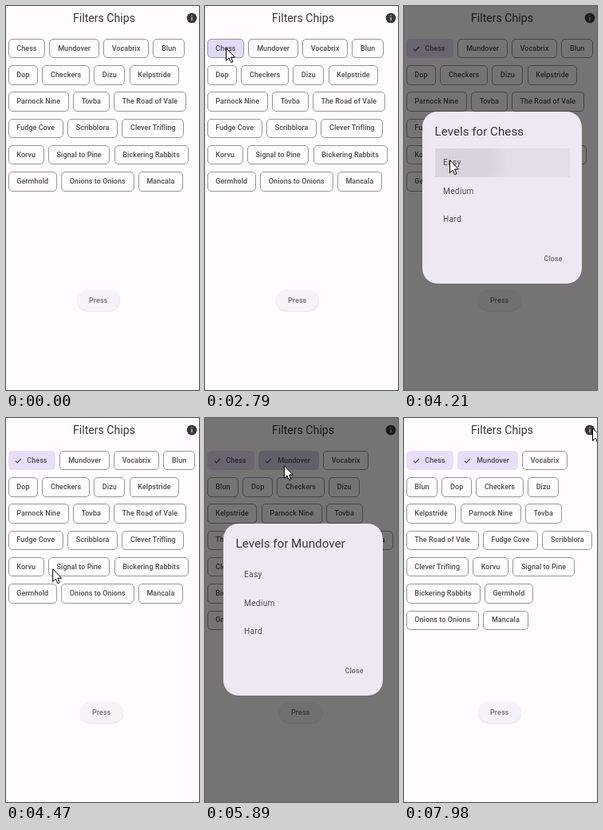
Write an HTML page that moves like this. It is 242 by 480 pixels and loops after 8 s.

```html
<!DOCTYPE html>
<html lang="en">
<head>
<meta charset="utf-8">
<title>Filters Chips</title>
<style>
* { box-sizing: border-box; }
html, body { margin: 0; width: 100%; height: 100%; overflow: hidden; }
body { background: #fffbfe; font: 500 9px/1 Roboto, sans-serif; letter-spacing: .06px; color: #4e4a51; }
#stage { position: relative; width: 242px; height: 480px; overflow: hidden; background: #fffbfe; }
#stage > * { position: absolute; }
h1, h2 { margin: 0; font-weight: 400; letter-spacing: 0; color: #39363c; white-space: nowrap; }
h1 { left: 23px; top: 4.5px; width: 200px; font-size: 14.1px; line-height: 20px; text-align: center; }
#info { left: 226px; top: 8px; }
#chips { left: 2.6px; top: 40.8px; width: 237px; display: flex; flex-wrap: wrap; gap: 8.8px 5.2px; }
.chip { position: relative; height: 24.5px; padding: 0 9.7px; display: flex; align-items: center;
  border: 1px solid #99949c; border-radius: 5px; white-space: nowrap; }
.chip svg { position: absolute; left: 7px; top: 7px; display: none; }
.chip.tint { background: #e3daf5; }
.chip.on { background: #e8def8; border-color: transparent; padding-left: 22.7px; }
.chip.on.tint { background: #d9d0e9; }
.chip.on svg { display: block; }
#press { left: 88.7px; top: 354.5px; width: 54px; height: 26px; border-radius: 13px; line-height: 26px;
  text-align: center; background: #f6f2f7; color: #716c74; box-shadow: 0 .5px 1.2px rgba(0,0,0,.16); }
#press.moved { left: 92.7px; }
#shade { inset: 0; background: rgba(0,0,0,.54); }
#dialog { left: 23px; top: 132px; width: 200px; height: 215px; border-radius: 19px; background: #eee8f4; }
#dialog > * { position: absolute; }
h2 { left: 15.5px; top: 15px; font-size: 15.2px; line-height: 21px; }
.row { left: 15.5px; width: 169.5px; height: 35.6px; padding-left: 10.5px; line-height: 35.6px;
  font-size: 10.15px; font-weight: 400; letter-spacing: .32px; }
.row.hover { background: rgba(28,27,31,.015); }
.row.down { background: radial-gradient(circle at 28px 16px, rgba(28,27,31,.1) 38px, rgba(28,27,31,.05) 64px); }
#close { left: 152.5px; top: 179.5px; color: #6a656d; }
#click { width: 24px; height: 24px; margin: -12px; border-radius: 50%; background: rgba(248,244,15,.66); }
#cursor { left: 0; top: 0; overflow: visible; }
</style>
</head>
<body>
<div id="stage">
  <h1>Filters Chips</h1>
  <svg id="info" width="14" height="14"><circle cx="7" cy="7" r="6.3" fill="#39363c"/><path d="M7 3.4v1.3M7 6v4.3" stroke="#e6e2e6" stroke-width="1.2"/></svg>
  <div id="chips"></div>
  <div id="press">Press</div>
  <div id="shade"></div>
  <div id="dialog">
    <h2></h2>
    <div class="row" style="top:46px">Easy</div>
    <div class="row" style="top:81.6px">Medium</div>
    <div class="row" style="top:117.2px">Hard</div>
    <span id="close">Close</span>
  </div>
  <div id="click"></div>
  <svg id="cursor" width="13" height="20"><path d="M.5 .6V16.4L4.1 13 6.6 18.6 9 17.6 6.6 12.1H11.4Z" fill="#fff" stroke="#000"/></svg>
</div>
<script>
const $ = s => document.querySelector(s);
const LOOP = 8000, TRAVEL = 750, TICK = 75, CLICK = 130;

const games = ['Chess', 'Mundover', 'Vocabrix', 'Blun', 'Dop', 'Checkers', 'Dizu', 'Kelpstride',
  'Parnock Nine', 'Tovba', 'The Road of Vale', 'Fudge Cove', 'Scribblora', 'Clever Trifling', 'Korvu',
  'Signal to Pine', 'Bickering Rabbits', 'Germhold', 'Onions to Onions', 'Mancala'];
const check = '<svg width="9" height="9"><path d="M.8 4.6L3.2 7 8 2" fill="none" stroke="#4e4a51" stroke-width="1.2"/></svg>';
const chips = games.map(name => {
  const el = document.createElement('div');
  el.className = 'chip';
  el.innerHTML = check + name;
  $('#chips').append(el);
  return el;
});
const rows = document.querySelectorAll('.row');

// Each dialog belongs to the chip and the level row with the same index.
const dialogs = [
  { tint: 2790, open: 2870, press: 4210, close: 4470 },
  { tint: 5620, open: 5820, press: 7240, close: 7240 }
];
const clicks = [1500, 4080, 5420, 7040];

// The cursor leaves for each stop at the given time; bow bends the way there.
const entry = { x: 204, y: 434 };
const stops = [
  { at: 520, x: 26, y: 52, bow: .22 },
  { at: 3070, x: 57, y: 192, bow: .42 },
  { at: 4470, x: 100, y: 54, bow: 0 },
  { at: 5890, x: 61, y: 231, bow: 0 },
  { at: 7520, x: 236, y: 12, bow: 0 }
];

function cursorAt(t) {
  const i = stops.filter(s => t >= s.at).length - 1;
  if (i < 0) return null;
  const to = stops[i], from = stops[i - 1] || entry;
  const travel = Math.min(TRAVEL, LOOP - 20 - to.at);
  const p = Math.min(1, Math.floor((t - to.at) / TICK + 1) * TICK / travel);
  const u = p * p * (3 - 2 * p);
  const dx = to.x - from.x, dy = to.y - from.y, bend = to.bow * Math.sin(Math.PI * u);
  return { x: from.x + dx * u + dy * bend, y: from.y + dy * u - dx * bend };
}

function show(el, visible) {
  el.style.visibility = visible ? 'visible' : 'hidden';
}

function render(t) {
  const pos = cursorAt(t);
  const current = dialogs.findIndex(d => t >= d.open && t < d.close);

  dialogs.forEach((d, i) => {
    const near = pos && Math.hypot(pos.x - stops[2 * i].x, pos.y - stops[2 * i].y) < 14;
    chips[i].classList.toggle('on', t >= d.open);
    chips[i].classList.toggle('tint', t >= d.tint && t < d.close && near);
    rows[i].classList.toggle('hover', i === current && pos.y > 178 + 36 * i);
    rows[i].classList.toggle('down', i === current && t >= d.press);
  });
  $('#press').classList.toggle('moved', t >= dialogs[0].open);

  show($('#shade'), current >= 0);
  show($('#dialog'), current >= 0);
  if (current >= 0) $('h2').textContent = 'Levels for ' + games[current];

  show($('#cursor'), pos);
  show($('#click'), clicks.some(c => t >= c && t < c + CLICK));
  if (pos) {
    const shift = `translate(${pos.x}px, ${pos.y}px)`;
    $('#cursor').style.transform = shift;
    $('#click').style.transform = shift;
  }
}

function frame() {
  render(performance.now() % LOOP);
  requestAnimationFrame(frame);
}
frame();
</script>
</body>
</html>
```
